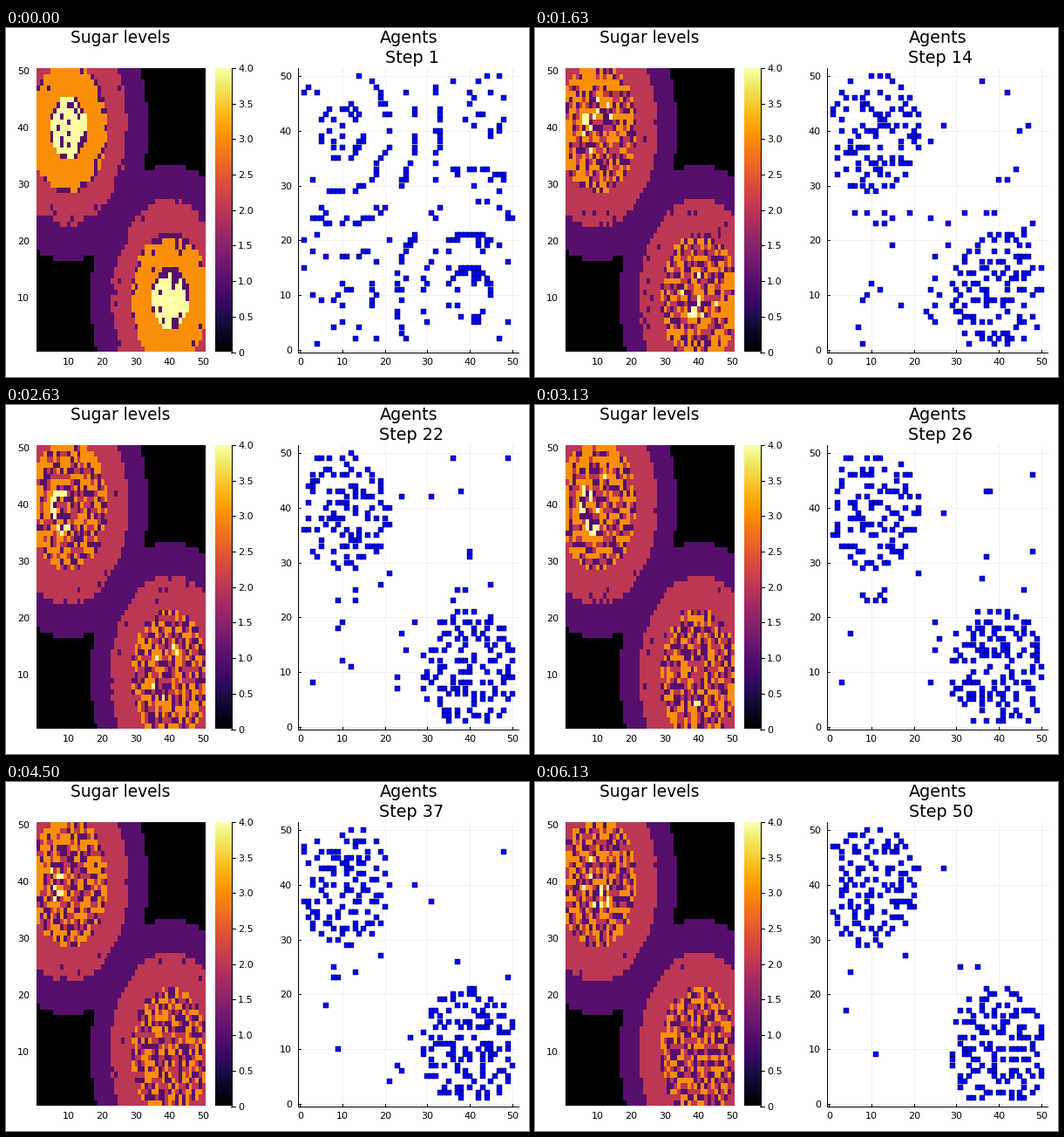
Recreate the animation shown at these times as a matplotlib script. Size 600 by 400 pixels, loop 6.26 s.

```python
import numpy as np
import matplotlib.pyplot as plt
from matplotlib.animation import FuncAnimation

WIDTH, HEIGHT, DPI = 600, 400, 100
LOOP_MS, TICK_MS = 6260, 20
STEPS, STEP_MS = 50, 125
SIZE, AGENTS, MAX_SUGAR, RING = 50, 250, 4, 6
PEAKS = ((10, 40), (40, 10))
TOP, BOTTOM = 46, 371.5

plt.rcParams["font.family"] = "DejaVu Sans"
rng = np.random.default_rng(8)


# --- model: agents walk to the richest free cell they can see and eat it ---

def sugar_capacity():
    x, y = np.mgrid[1:SIZE + 1, 1:SIZE + 1]
    nearest = np.min([np.rint(np.hypot(x - px, y - py)) for px, py in PEAKS], axis=0)
    return np.maximum(0, MAX_SUGAR - nearest // RING).astype(int)


def new_agent(occupied):
    free = np.argwhere(~occupied)
    x, y = free[rng.integers(len(free))]
    occupied[x, y] = True
    return {"pos": (x, y), "vision": rng.integers(2, 7),
            "metabolism": rng.integers(1, 5), "wealth": rng.integers(5, 26),
            "age": 0, "max_age": rng.integers(60, 101)}


def best_site(agent, sugar, occupied):
    x, y = agent["pos"]
    reach = agent["vision"]
    x0, y0 = max(0, x - reach), max(0, y - reach)
    window = np.s_[x0:x + reach + 1, y0:y + reach + 1]
    visible = np.where(occupied[window], -1, sugar[window])
    if visible.max() <= 0:
        return x, y
    sites = np.argwhere(visible == visible.max()) + (x0, y0)
    distance = ((sites - (x, y)) ** 2).sum(axis=1)
    sites = sites[distance == distance.min()]
    return tuple(sites[rng.integers(len(sites))])


def simulate():
    capacity = sugar_capacity()
    sugar = capacity.copy()
    occupied = np.zeros((SIZE, SIZE), bool)
    agents = [new_agent(occupied) for _ in range(AGENTS)]
    history = []
    for _ in range(STEPS):
        for i in rng.permutation(AGENTS):
            agent = agents[i]
            site = best_site(agent, sugar, occupied)
            occupied[agent["pos"]] = False
            occupied[site] = True
            agent["pos"] = site
            agent["wealth"] += sugar[site] - agent["metabolism"]
            sugar[site] = 0
            agent["age"] += 1
            if agent["wealth"] <= 0 or agent["age"] >= agent["max_age"]:
                occupied[site] = False
                agents[i] = new_agent(occupied)
        sugar = np.minimum(sugar + 1, capacity)
        history.append((sugar.T.copy(), np.array([a["pos"] for a in agents]) + 1))
    return history


# --- drawing, laid out in pixels from the top left corner ---

fig = plt.figure(figsize=(WIDTH / DPI, HEIGHT / DPI), dpi=DPI, facecolor="white")


def pt(pixels):
    return pixels * 72 / DPI


def panel(left, right, bottom=BOTTOM):
    ax = fig.add_axes([left / WIDTH, 1 - bottom / HEIGHT,
                       (right - left) / WIDTH, (bottom - TOP) / HEIGHT])
    ax.set(xticks=[], yticks=[])
    ax.spines[:].set_visible(False)
    ax.patch.set_visible(False)
    return ax


def label(x, baseline, text, size=11.1, ha="center"):
    return fig.text(x / WIDTH, 1 - baseline / HEIGHT, text, fontsize=pt(size),
                    ha=ha, va="baseline")


def stroke(xs, ys, color="black", width=1, z=0):
    xs, ys = np.array(xs) / WIDTH, 1 - np.array(ys) / HEIGHT
    fig.add_artist(plt.Line2D(xs, ys, color=color, lw=pt(width), zorder=z))


history = simulate()

# Sugar heatmap
heat_left, heat_right, heat_bottom = 34.6, 228, 371
heat = panel(heat_left, heat_right, heat_bottom).imshow(
    history[0][0], cmap="inferno", vmin=0, vmax=MAX_SUGAR, origin="lower",
    extent=(0.5, 50.5, 0.5, 50.5), aspect="auto", interpolation="nearest")
label(131, 17, "Sugar levels", 18.7)
for value in range(10, 51, 10):
    part = (value - 0.5) / SIZE
    label(heat_left + part * (heat_right - heat_left), 386, value)
    label(27, heat_bottom - part * (heat_bottom - TOP) + 4, value, ha="right")

# Colour bar
panel(240, 258, heat_bottom).imshow(np.linspace(0, 1, 256)[:, None], cmap="inferno",
                                    origin="lower", aspect="auto")
stroke((258.5, 258.5), (TOP, BOTTOM))
for value in np.arange(0, 4.1, 0.5):
    y = BOTTOM - value / MAX_SUGAR * (BOTTOM - TOP)
    stroke((258, 263), (y, y))
    label(266, y + 4, f"{value:.1f}" if value else "0", ha="left")

# Agent scatter
plot_left, plot_right = 335, 588
low, high = -0.47, 51.47
scatter_ax = panel(plot_left, plot_right)
scatter_ax.set(xlim=(low, high), ylim=(low, high))
dots, = scatter_ax.plot([], [], "s", ms=pt(6), mfc="blue", mec="black",
                        mew=pt(0.45), clip_on=False)
for value in range(0, 51, 10):
    part = (value - low) / (high - low)
    x = plot_left + part * (plot_right - plot_left)
    y = BOTTOM - part * (BOTTOM - TOP)
    stroke((x, x), (TOP, BOTTOM), "#eeeeee", 0.8, -1)
    stroke((plot_left, plot_right), (y, y), "#eeeeee", 0.8, -1)
    stroke((x, x), (BOTTOM, BOTTOM - 3))
    stroke((plot_left, plot_left + 3), (y, y))
    label(x, 386, value)
    label(328, y + 4, value, ha="right")
stroke((plot_left, plot_left), (TOP, BOTTOM))
stroke((plot_left, plot_right), (BOTTOM, BOTTOM))
label(462, 17, "Agents", 19.2)
step_label = label(465.5, 40, "", 19.2)


def draw(tick):
    # Sampled mid-tick; the last step is held until the loop ends.
    step = min(STEPS - 1, int((tick + 0.5) * TICK_MS / STEP_MS))
    sugar, positions = history[step]
    heat.set_data(sugar)
    dots.set_data(positions[:, 0], positions[:, 1])
    step_label.set_text(f"Step {step + 1}")
    return heat, dots, step_label


animation = FuncAnimation(fig, draw, frames=LOOP_MS // TICK_MS, interval=TICK_MS,
                          repeat=True, repeat_delay=0)
plt.show()
```
